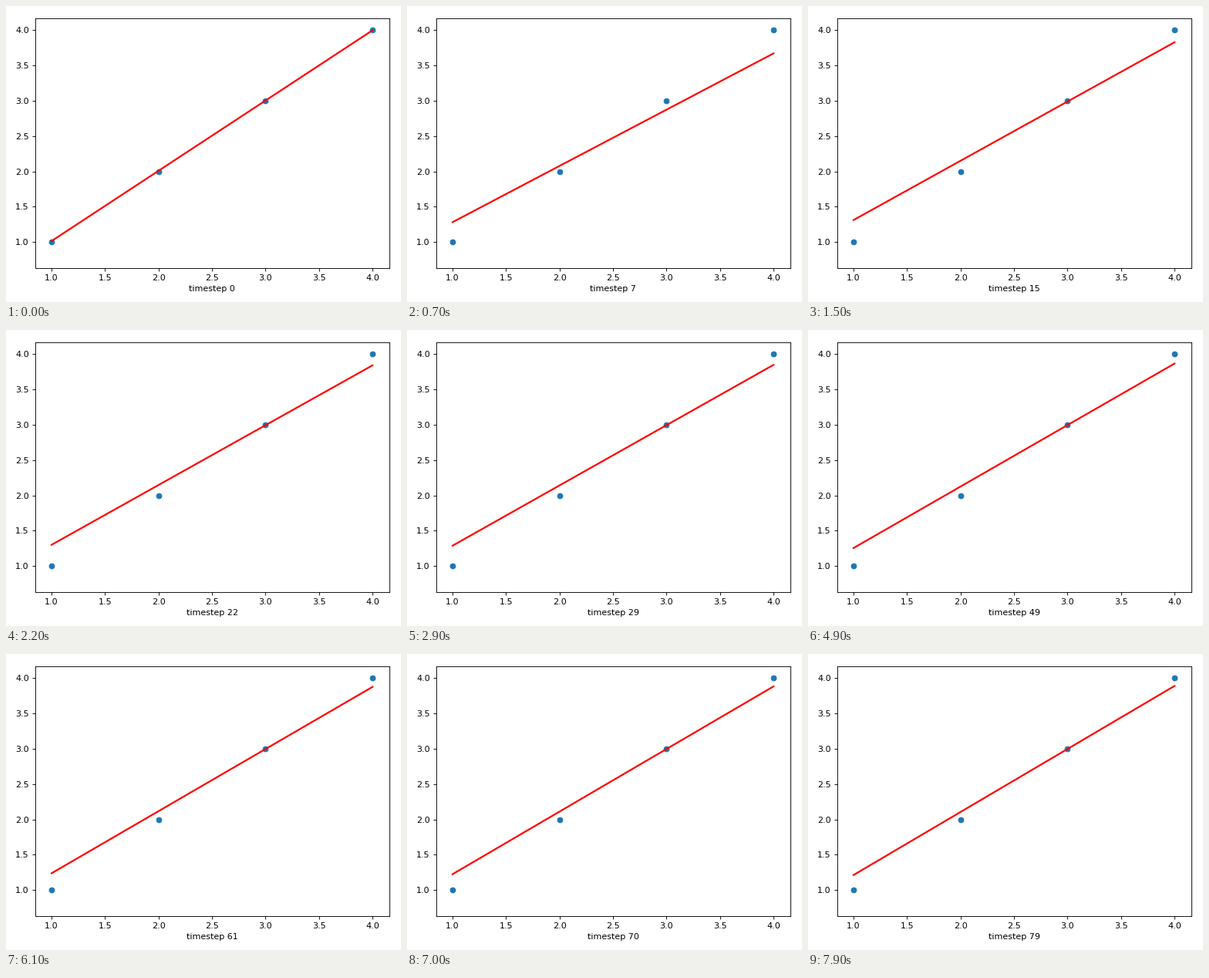
These frames come from a looping animation (512 by 384 pixels, 8 s). A matplotlib script:

```python
import numpy as np
import matplotlib.pyplot as plt
from matplotlib.animation import FuncAnimation

W, H, DPI = 512, 384, 80
FRAMES, INTERVAL = 80, 100
STEPS, RATE = 500, 0.02

plt.rcParams["font.family"] = "DejaVu Sans"
plt.rcParams["font.size"] = 10

x = np.array([1.0, 2.0, 3.0, 4.0])
y = x.copy()


def descend(slope, bias):
    """Gradient descent on the mean squared error, keeping every step."""
    path = []
    for _ in range(STEPS):
        path.append((slope, bias))
        err = slope * x + bias - y
        slope -= RATE * 2 * np.mean(err * x)
        bias -= RATE * 2 * np.mean(err)
    return path


path = descend(0.4147, 0.381)

left, right, bottom, top = 37.6, 496.6, 44.0, 368.1
fig = plt.figure(figsize=(W / DPI, H / DPI), dpi=DPI, facecolor="white")
ax = fig.add_axes([left / W, bottom / H, (right - left) / W, (top - bottom) / H])
ax.scatter(x, y)
line, = ax.plot(x, y, "r-", linewidth=2)
ax.set_xlim(0.8453, 4.1547)
ax.set_ylim(0.63535, 4.15992)
ax.set_xticks(np.arange(1, 4.1, 0.5))
ax.set_yticks(np.arange(1, 4.1, 0.5))
label = fig.text((left + right) / 2 / W, 14 / H, "", ha="center", va="baseline")


def update(i):
    # step 0 wraps round to the finished fit
    slope, bias = path[i - 1]
    line.set_ydata(slope * x + bias)
    label.set_text(f"timestep {i}")
    return line, label


anim = FuncAnimation(fig, update, frames=FRAMES, interval=INTERVAL,
                     repeat=True, repeat_delay=0)
plt.show()
```
